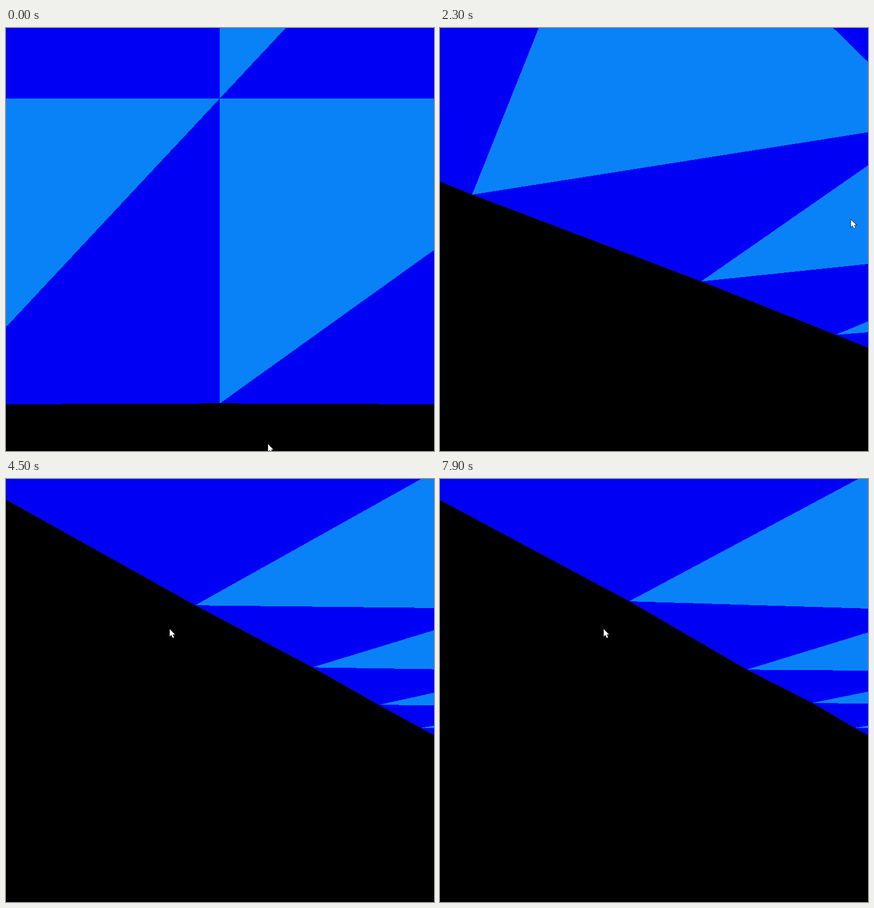
Animation of 753 by 744 pixels, one loop 8 s. Source, as an HTML page:

```html
<!DOCTYPE html>
<html lang="en">
<head>
<meta charset="utf-8">
<title>Tiled ceiling</title>
<style>
  html, body { margin: 0; width: 100%; height: 100%; overflow: hidden; background: #000; }
  svg { display: block; width: 100vw; height: 100vh; }
</style>
</head>
<body>
<svg viewBox="0 0 753 744">
  <rect width="753" height="744"/>
  <g shape-rendering="crispEdges">
    <path id="dark" fill="#0000f5"/>
    <path id="light" fill="#0a82f7"/>
  </g>
  <path id="cursor" d="M0 0V13L3 10.2L5.3 15.5L7.7 14.5L5.4 9.4H9.4Z"
        fill="#fff" stroke="#000" stroke-width="1.2" paint-order="stroke"/>
</svg>
<script>
const LOOP = 8000, STEP = 100;
const FOCAL = 644, CX = 376, CY = 372, NEAR = 0.04;

// time, yaw, pitch, distance to edge, side offset, ceiling height,
// then height ripples: edge vertices 0..3, second-row vertices 1..3
const camera = [
  [0,    0,    65.2,  1.06, 0,    0.919,  0.005, 0, 0, 0,  0, 0, 0],
  [1000, 0,    50.7,  1.05, 0,    0.922, -0.003, 0, 0, 0,  0, 0, 0],
  [1800, 20,   46.5,  1.05, 0.02, 0.92,  -0.01, 0, 0, 0,  0, 0, 0],
  [2300, 34,   39.6,  1.05, 0.03, 0.92,  -0.018, 0, 0, 0, -0.01, 0, 0],
  [2700, 40,   30.8,  1.08, 0.05, 0.95,  0, 0, 0, 0, -0.03, -0.02, -0.01],
  [3000, 42.4, 27.5,  1.09, 0.07, 0.965, 0, 0, 0, 0, -0.05, -0.04, -0.028],
  [3600, 45,   21.06, 1.09, 0.07, 0.965, 0.005, 0.004, 0.02, 0, -0.05, -0.024, -0.015],
  [5400, 45,   21.06, 1.09, 0.07, 0.965, 0.03, 0.004, 0.012, 0.005, -0.031, -0.005, 0],
  [7900, 45,   21.06, 1.09, 0.07, 0.965, 0.01, 0.026, 0, 0.02, -0.047, -0.025, -0.012]
];

const pointer = [
  [0, 461, 732], [1000, 656, 424], [2300, 723, 337], [3000, 726, 338],
  [3600, 320, 306], [4100, 288, 264], [7900, 288, 264]
];

const byId = id => document.getElementById(id);
const dark = byId("dark"), light = byId("light"), cursor = byId("cursor");

function sample(keys, t) {
  let i = 0;
  while (i < keys.length - 2 && keys[i + 1][0] <= t) i++;
  const [a, b] = [keys[i], keys[i + 1]];
  const k = Math.min(1, (t - a[0]) / (b[0] - a[0]));
  return a.slice(1).map((v, n) => v + (b[n + 1] - v) * k);
}

function makeView([yaw, pitch, distance, side, height, ...ripples]) {
  const rad = Math.PI / 180;
  const sy = Math.sin(yaw * rad), cy = Math.cos(yaw * rad);
  const sp = Math.sin(pitch * rad), cp = Math.cos(pitch * rad);
  const ripple = (u, v) =>
    v === 0 && u >= 0 && u < 4 ? ripples[u] :
    v === 1 && u > 0 && u < 4 ? ripples[3 + u] : 0;
  return (u, v) => {
    const right = u - side, ahead = distance - v;
    const h = height + ripple(u, v);
    const flat = right * sy + ahead * cy;
    return [right * cy - ahead * sy, h * cp - flat * sp, flat * cp + h * sp];
  };
}

function clipNear(points) {
  const out = [];
  points.forEach((p, i) => {
    const q = points[(i + 1) % points.length];
    if (p[2] >= NEAR) out.push(p);
    if ((p[2] >= NEAR) !== (q[2] >= NEAR)) {
      const k = (NEAR - p[2]) / (q[2] - p[2]);
      out.push(p.map((c, n) => c + (q[n] - c) * k));
    }
  });
  return out;
}

function outline(points) {
  const visible = clipNear(points);
  if (visible.length < 3) return "";
  return "M" + visible.map(([x, y, z]) =>
    (CX + FOCAL * x / z).toFixed(2) + " " + (CY - FOCAL * y / z).toFixed(2)).join("L") + "Z";
}

function draw(t) {
  const view = makeView(sample(camera, t));
  let darkPath = "", lightPath = "";
  for (let v = 0; v < 4; v++) {
    for (let u = -4; u < 10; u++) {
      const near = view(u, v), far = view(u + 1, v + 1);
      const upper = outline([near, view(u, v + 1), far]);
      darkPath += upper + outline([near, far, view(u + 1, v)]);
      lightPath += upper;
    }
  }
  dark.setAttribute("d", darkPath);
  light.setAttribute("d", lightPath);
  const [x, y] = sample(pointer, t).map(Math.round);
  cursor.setAttribute("transform", `translate(${x} ${y})`);
}

const start = performance.now();
function tick() {
  const t = (performance.now() - start) % LOOP;
  draw(Math.floor(t / STEP) * STEP);
  requestAnimationFrame(tick);
}
tick();
</script>
</body>
</html>
```
